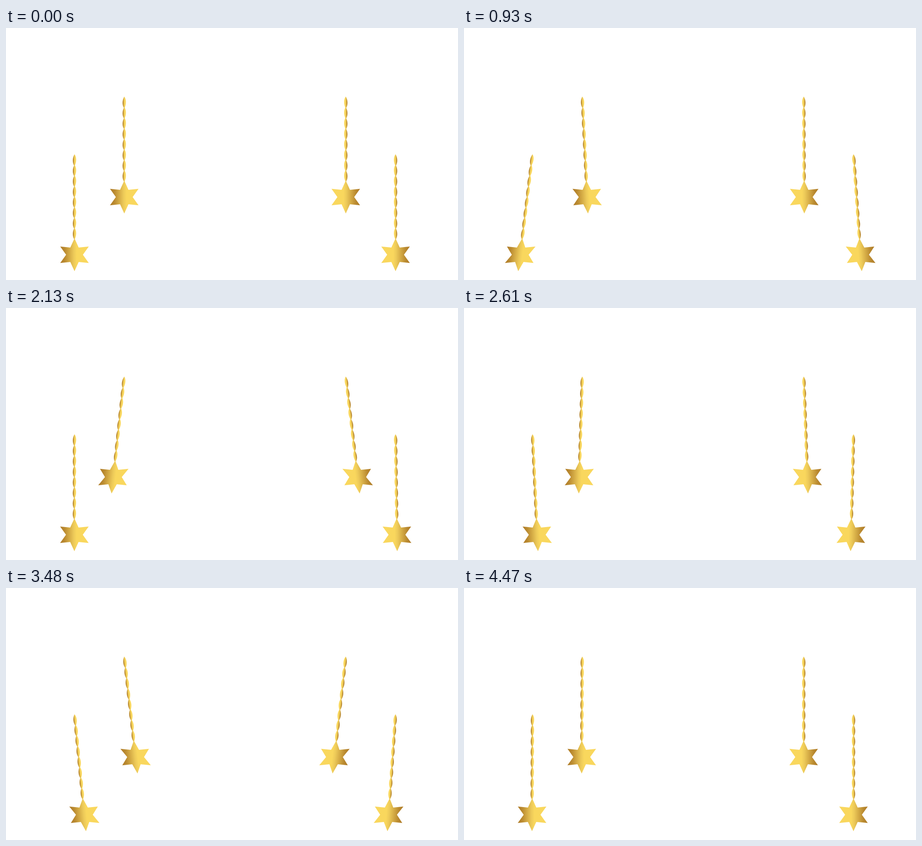
An HTML page with a canvas for the animation above (4.5 s loop, 1001 by 559 pixels).

```html
<!DOCTYPE html>
<html lang="en">
<head>
<meta charset="utf-8">
<title>Hanging stars</title>
<style>
  html, body { margin: 0; width: 100%; height: 100%; overflow: hidden; background: #fff; }
  canvas { display: block; width: 1001px; height: 559px; }
</style>
</head>
<body>
<canvas id="stage" width="1001" height="559"></canvas>
<script>
const ctx = document.getElementById('stage').getContext('2d');
const LOOP = 4500, STEP = 30;
const MIRROR = 1014.4; // sum of the x positions of a left and right pair
const BEADS = 8, PITCH = 23.3;

function gold(half) {
  const g = ctx.createLinearGradient(-half, 0, half, 0);
  g.addColorStop(0, '#ae7a26');
  g.addColorStop(0.15, '#b98930');
  g.addColorStop(0.48, '#edca59');
  g.addColorStop(0.58, '#f9d75d');
  return g;
}
const starFill = gold(32), beadFill = gold(3.8);

function makeStar(cy, outer, inner) {
  const p = new Path2D();
  for (let i = 0; i < 12; i++) {
    const r = i % 2 ? inner : outer, a = i * Math.PI / 6;
    p.lineTo(r * Math.sin(a), cy - r * Math.cos(a));
  }
  p.closePath();
  return p;
}
const star = makeStar(223, 36.5, 18.6);
const bead = new Path2D('M0 0C4.6 6 5.2 17 0 26.6C-4.8 20 -5.2 9 0 0Z');

// Straight swings between turning points; the last one runs on past its end
function zigzag(t, times, values) {
  let i = 1;
  while (i < times.length - 1 && t >= times[i]) i++;
  const u = (t - times[i - 1]) / (times[i] - times[i - 1]);
  return values[i - 1] + (values[i] - values[i - 1]) * u;
}

// Outer pendants swing out and back once, inner ones turn three times
const outer = (t, turn, reach, home) =>
  zigzag(t, [0, turn, 3300, home], [0, reach, 0.48 - reach, 0]);
const inner = (t, turn, home) =>
  zigzag(t, [0, turn, 2170 - turn / 5, 3505, home], [0, turn * 0.0041, -7.4, 6.67, 0]);

// Draws a pendant leaning by an angle in degrees; flip -1 mirrors its shading
function pendant(x, y, flip, angle) {
  ctx.save();
  ctx.transform(flip, 0, Math.tan(angle * Math.PI / 180), 1, x, y);
  ctx.fillStyle = starFill;
  ctx.fill(star);
  ctx.fillStyle = beadFill;
  for (let i = 0; i < BEADS; i++) {
    ctx.fill(bead);
    ctx.translate(0, PITCH);
  }
  ctx.restore();
}

function frame() {
  const t = Math.floor(performance.now() % LOOP / STEP) * STEP;
  ctx.fillStyle = '#fff';
  ctx.fillRect(0, 0, 1001, 559);
  for (const flip of [1, -1]) {
    const left = flip > 0, home = left ? 4430 : 4480;
    const place = x => left ? x : MIRROR - x;
    const out = left ? outer(t, 900, 7.13, home) : outer(t, 1200, 5.17, home);
    pendant(place(151.7), 280, flip, -flip * out);
    pendant(place(261.9), 152, flip, flip * inner(t, left ? 855 : 540, home));
  }
  requestAnimationFrame(frame);
}
frame();
</script>
</body>
</html>
```
